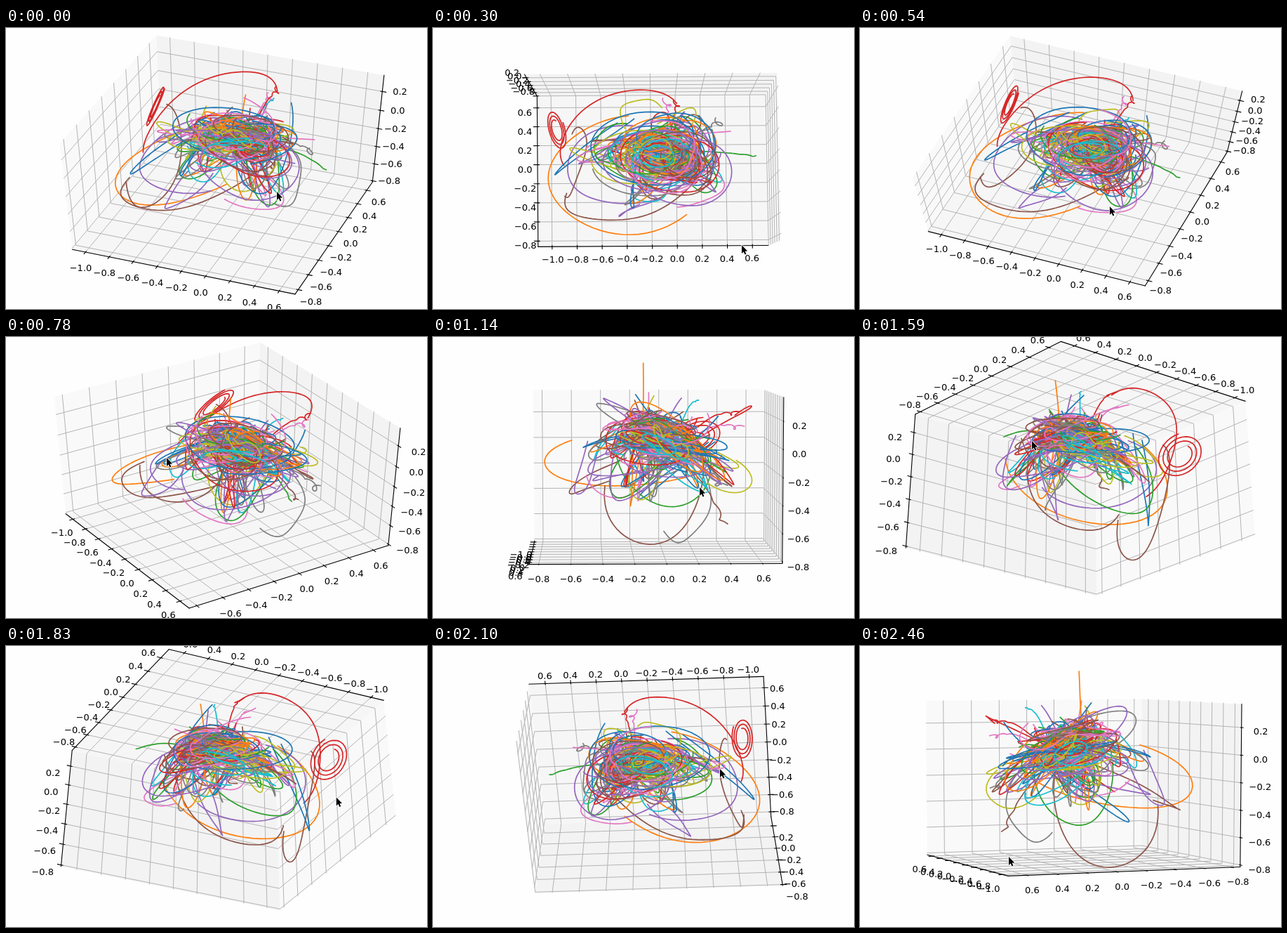
An HTML page with a canvas that plays this animation: 600 px wide and 400 px high, repeating every 2.49 s.

```html
<!DOCTYPE html>
<html lang="en">
<head>
<meta charset="utf-8">
<title>Rotating 3D plot</title>
<style>
html, body { margin: 0; width: 100%; height: 100%; overflow: hidden; background: #fefefe; }
canvas { display: block; }
</style>
</head>
<body>
<canvas id="stage" width="600" height="400"></canvas>
<script>
const ctx = document.getElementById('stage').getContext('2d');
const LOOP = 2490, STEP = 30, RAD = Math.PI / 180, TAU = 2 * Math.PI;
const HALF = 0.521;        // half edge of the drawn box; the data cube has edge 1
const LABEL_GAP = 0.06;

// time, azimuth, elevation, pointer x, pointer y
const KEYS = [
  [0, -69, 48, 386, 233],
  [300, -90.5, 85, 440, 309],
  [780, -33, 42.5, 229, 172],
  [860, -25, 36, 205, 157],
  [960, -25, 36, 440, 276],
  [1140, -1.7, 5.6, 380, 214],
  [1590, 51, -32.5, 245, 148],
  [1700, 64, -43, 212, 128],
  [1850, 64, -43, 484, 220],
  [2100, 93, -66.5, 409, 175],
  [2460, 158, 5, 212, 300]
];

// centre, range, first and last tick (in fifths), pane colour
const AXES = [
  { mid: -0.192, range: 1.766, from: -5, to: 3, pane: '#f9f9f9' },
  { mid: -0.068, range: 1.518, from: -4, to: 3, pane: '#f3f3f3' },
  { mid: -0.2225, range: 1.136, from: -4, to: 1, pane: '#f6f6f6' }
];

const COLOURS = [
  '#1f77b4', '#ff7f0e', '#2ca02c', '#d62728', '#9467bd',
  '#8c564b', '#e377c2', '#7f7f7f', '#bcbd22', '#17becf'
];
const [BLUE, ORANGE, GREEN, RED, PURPLE, BROWN, PINK, GRAY, OLIVE, CYAN] = COLOURS;

// ---- motion ----

// Monotone cubic interpolation of one column of KEYS
function track(col, t) {
  const last = KEYS.length - 2;
  const slope = i => (KEYS[i + 1][col] - KEYS[i][col]) / (KEYS[i + 1][0] - KEYS[i][0]);
  const tangent = i => {
    if (i === 0) return slope(0);
    if (i > last) return slope(last);
    const a = slope(i - 1), b = slope(i);
    return a * b > 0 ? 2 * a * b / (a + b) : 0;
  };
  let i = 0;
  while (i < last && t >= KEYS[i + 1][0]) i++;
  const span = KEYS[i + 1][0] - KEYS[i][0], s = (t - KEYS[i][0]) / span;
  const s2 = s * s, s3 = s2 * s;
  return KEYS[i][col] * (2 * s3 - 3 * s2 + 1) + KEYS[i + 1][col] * (3 * s2 - 2 * s3) +
    span * (tangent(i) * (s3 - 2 * s2 + s) + tangent(i + 1) * (s3 - s2));
}

function camera(azimuth, elevation) {
  const ca = Math.cos(azimuth * RAD), sa = Math.sin(azimuth * RAD);
  const ce = Math.cos(elevation * RAD), se = Math.sin(elevation * RAD);
  const toward = [ce * ca, ce * sa, se];
  const project = ([x, y, z]) => {
    const scale = 10 / (10 - (toward[0] * x + toward[1] * y + toward[2] * z));
    return [
      312.5 + 330 * scale * (ca * y - sa * x),
      193.5 - 217 * scale * (ce * z - se * (ca * x + sa * y))
    ];
  };
  return { project, far: toward.map(v => v > 0 ? -HALF : HALF) };
}

// ---- curves, in coordinates of the data cube ----

let seed = 7;
function random() {
  seed = (seed * 16807) % 2147483647;
  return seed / 2147483647;
}
const spread = size => (random() * 2 - 1) * size;

const curves = [];

function curve(colour, steps, pointAt) {
  curves.push({ colour, points: Array.from({ length: steps + 1 }, (_, i) => pointAt(i / steps)) });
}

// Half an ellipse from start to end, pushed out by bulge; sweep above 1 runs on past the end
function arc(colour, start, end, bulge, sweep = 1) {
  const phase = random() * TAU;
  curve(colour, 40, t => {
    const a = Math.PI * sweep * t, c = Math.cos(a), s = Math.sin(a);
    return start.map((v, n) => (v * (1 + c) + end[n] * (1 - c)) / 2 + bulge[n] * s +
      0.006 * Math.sin(11 * t + phase + 2 * n));
  });
}

// A loose end that leaves the tangle and curls up near its tip
function straggler(colour, tip, curl) {
  const root = [0.06, 0.08, 0.25];
  curve(colour, 50, t => {
    const k = 0.4 + 0.6 * t, size = curl * t ** 4;
    return root.map((v, n) => v + (tip[n] - v) * k +
      size * Math.sin(24 * t + 1.7 * n) + (n === 2 ? 0.04 * Math.sin(Math.PI * t) : 0));
  });
}

// The long excursions
arc(ORANGE, [-0.1, 0.3, 0.11], [-0.1, -0.46, 0.06], [-0.35, 0, -0.22], 1.25);
arc(RED, [-0.38, -0.01, -0.03], [0.11, 0.35, 0.38], [-0.1, 0.19, 0.17]);
arc(BROWN, [-0.38, -0.18, -0.09], [0.18, -0.12, 0.12], [-0.06, -0.21, -0.15]);
arc(BROWN, [-0.39, -0.2, -0.12], [-0.3, 0.24, -0.06], [0.02, -0.02, -0.43], 1.3);
arc(PURPLE, [-0.05, -0.28, 0.2], [-0.03, -0.26, 0], [-0.11, -0.06, -0.24], 1.2);
arc(PURPLE, [-0.08, 0.24, 0.16], [-0.14, -0.26, -0.06], [-0.26, 0.02, -0.05], 1.2);
arc(BLUE, [-0.08, 0.28, 0.2], [-0.3, 0.1, 0], [-0.22, -0.22, -0.3], 1.2);
arc(GREEN, [-0.1, 0.25, 0.12], [0, -0.15, 0.12], [-0.2, 0.05, -0.38]);
arc(GRAY, [0.22, 0.04, -0.36], [0.22, 0.22, 0.02], [0.06, 0.06, -0.16]);
arc(PINK, [0.2, -0.05, 0.02], [0.1, -0.28, 0], [0.15, 0, -0.14]);
arc(OLIVE, [0.05, 0.36, 0.08], [-0.12, 0.25, -0.08], [-0.06, 0.12, -0.12]);

straggler(GREEN, [0.45, 0.04, 0.07], 0.006);
straggler(GRAY, [0.31, 0.29, -0.08], 0.035);
straggler(PINK, [0.07, 0.38, 0.29], 0.025);
straggler(CYAN, [0.15, 0.19, 0.48], 0.005);
straggler(BROWN, [0.12, 0.31, -0.34], 0.02);
straggler(RED, [0.11, 0.36, 0.39], 0.02);

// Coil that opens into the long red arc
curve(RED, 110, t => {
  const a = 18 * t, size = 0.45 + 0.55 * t;
  const major = size * Math.cos(a), minor = size * Math.sin(a);
  return [-0.405 - 0.045 * minor, 0.21 + 0.11 * major + 0.06 * minor, 0.2 + 0.1 * major - 0.1 * minor];
});

const dome = (x, y, lift) => lift - 0.33 * y - 1.5 * (x * x + y * y);

// Loops that leave the dome, pass near tip and come back
function loops(count, tip, size) {
  for (let i = 0; i < count; i++) {
    const root = () => {
      const x = 0.06 + tip[0] * 0.4 + spread(0.12), y = 0.02 + tip[1] * 0.4 + spread(0.13);
      return [x, y, dome(x, y, 0.27 + spread(0.08))];
    };
    const a = root(), b = root();
    const bulge = tip.map((v, n) => v + spread(size) - (a[n] + b[n]) / 2);
    arc(COLOURS[(i * 3 + count) % 10], a, b, bulge, 1 + 0.3 * random());
  }
}
loops(14, [0.2, -0.09, -0.1], 0.1);
loops(16, [-0.22, 0.06, 0.08], 0.12);
loops(9, [0.12, 0.27, -0.02], 0.08);
loops(9, [-0.08, -0.22, 0.1], 0.1);

// Tilted orbits that wander over the dome; each colour has its own home
for (let i = 0; i < 80; i++) {
  const home = (i % 10) * TAU / 10 - 0.6;
  const cx = 0.07 + 0.05 * Math.sin(home) + spread(0.06);
  const cy = 0.03 + 0.04 * Math.cos(home) + spread(0.06);
  const radius = 0.05 + 0.19 * random() ** 1.3, start = random() * TAU;
  const turn = (random() < 0.5 ? -1 : 1) * (4 + 8 * random());
  const beat = 3 + 6 * random(), phase = random() * TAU;
  const tiltX = spread(0.55), tiltY = spread(0.55), lift = 0.28 + spread(0.1);
  curve(COLOURS[i % 10], 80, t => {
    const a = start + turn * t, r = radius * (0.65 + 0.35 * Math.cos(beat * t + phase));
    const dx = r * Math.cos(a) * (Math.cos(a) < 0 ? 1.25 : 0.85), dy = r * 1.1 * Math.sin(a);
    const x = cx + dx, y = cy + dy;
    return [x, y, dome(x, y, lift) + tiltX * dx + tiltY * dy + 0.04 * Math.sin(beat * 1.7 * t + start)];
  });
}

// ---- drawing ----

function path(points, project) {
  ctx.beginPath();
  for (const p of points) ctx.lineTo(...project(p));
}

function line(points, project, colour, width) {
  path(points, project);
  ctx.strokeStyle = colour;
  ctx.lineWidth = width;
  ctx.stroke();
}

const moved = (p, axis, value) => p.map((v, i) => i === axis ? value : v);

function drawPanes({ project, far }) {
  AXES.forEach((axis, i) => {
    const a = (i + 1) % 3, b = (i + 2) % 3;
    const corner = (u, v) => moved(moved(far, a, u * HALF), b, v * HALF);
    path([corner(-1, -1), corner(1, -1), corner(1, 1), corner(-1, 1)], project);
    ctx.fillStyle = axis.pane;
    ctx.fill();
  });
}

function drawAxis({ project, far }, index) {
  const axis = AXES[index];
  const flip = index === 0 ? 1 : 0;       // the axis sits on the near side here
  const other = 3 - index - flip;
  const edge = moved(far, flip, -far[flip]);
  const at = n => (n / 5 - axis.mid) / axis.range;

  for (let n = axis.from; n <= axis.to; n++) {
    const corner = moved(far, index, at(n));
    line([moved(corner, flip, -far[flip]), corner, moved(corner, other, -far[other])],
      project, '#b4b4b4', 1);
  }
  line([moved(edge, index, -HALF), moved(edge, index, HALF)], project, '#000', 1.1);

  ctx.fillStyle = '#000';
  for (let n = axis.from; n <= axis.to; n++) {
    const tick = moved(edge, index, at(n)), out = Math.sign(tick[flip]);
    line([moved(tick, flip, tick[flip] - out * 0.008), moved(tick, flip, tick[flip] + out * 0.017)],
      project, '#000', 1.1);
    const spot = tick.map((v, i) => i === index ? v : v + Math.sign(v) * LABEL_GAP);
    const [x, y] = project(spot);
    ctx.fillText((n < 0 ? '\u2212' : '') + Math.abs(n / 5).toFixed(1), x, y + 10);
  }
}

const ARROW = [[0, 0], [0, 12], [2.7, 9.5], [4.5, 13.5], [6.4, 12.7], [4.7, 8.7], [8.2, 8.5]];

function drawPointer(x, y) {
  path(ARROW, ([dx, dy]) => [x + dx, y + dy]);
  ctx.closePath();
  ctx.strokeStyle = '#fff';
  ctx.lineWidth = 1.6;
  ctx.stroke();
  ctx.fillStyle = '#000';
  ctx.fill();
}

function draw(now) {
  const t = Math.floor((now % LOOP) / STEP) * STEP;
  const view = camera(track(1, t), track(2, t));
  ctx.fillStyle = '#fefefe';
  ctx.fillRect(0, 0, 600, 400);
  ctx.font = '13px "DejaVu Sans", sans-serif';
  ctx.textAlign = 'center';
  ctx.lineJoin = ctx.lineCap = 'round';
  drawPanes(view);
  for (let i = 0; i < 3; i++) drawAxis(view, i);
  for (const { points, colour } of curves) line(points, view.project, colour, 1.7);
  drawPointer(track(3, t), track(4, t));
}

const begin = performance.now();
function tick() {
  draw(performance.now() - begin);
  requestAnimationFrame(tick);
}
tick();
</script>
</body>
</html>
```
